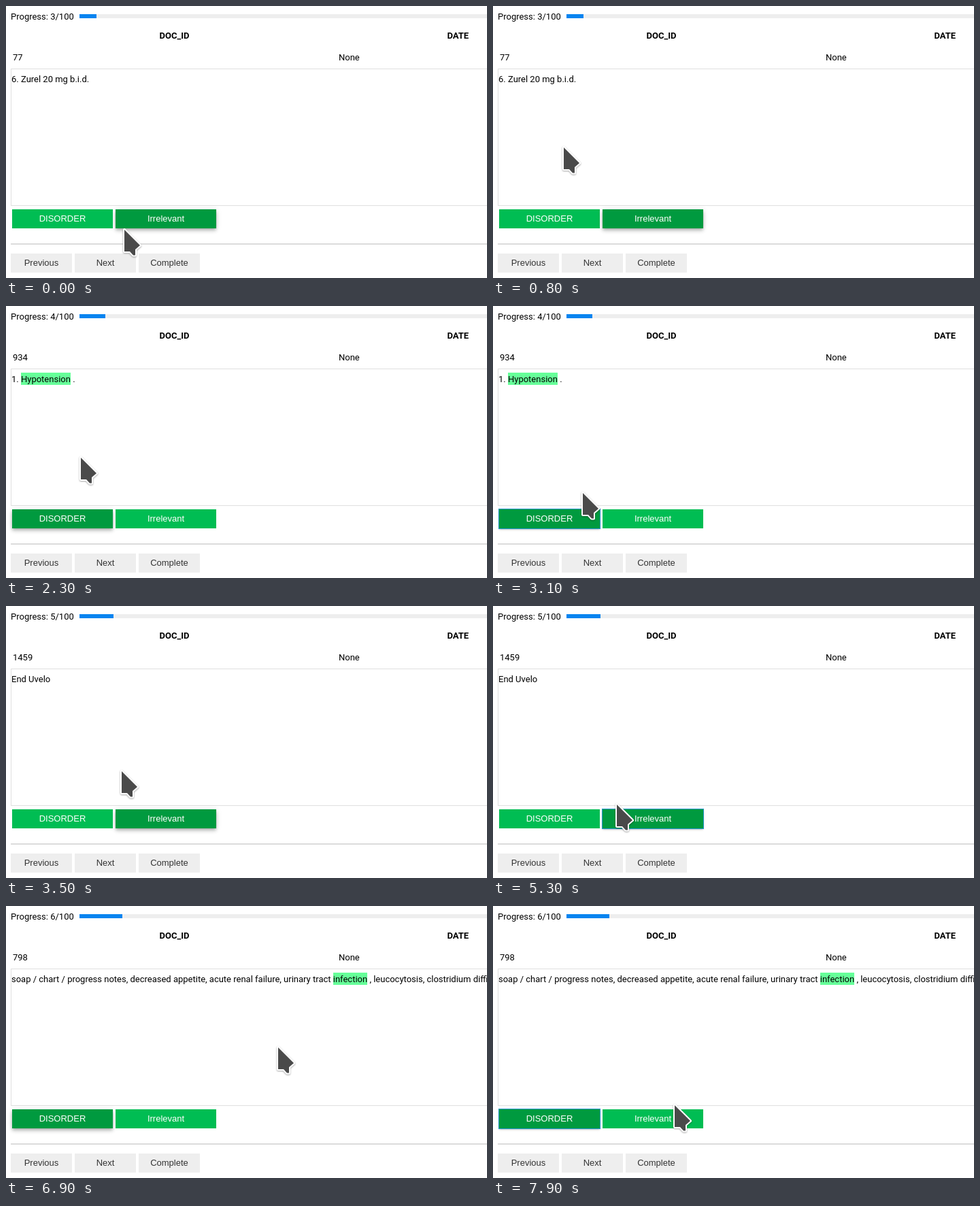
An HTML page that plays this animation: 707 by 400 pixels, repeating every 8 s.

```html
<!DOCTYPE html>
<html lang="en">
<head>
<meta charset="utf-8">
<style>
html, body { margin: 0; width: 100%; height: 100%; overflow: hidden; background: #fff; }
#stage { position: relative; width: 707px; height: 400px; overflow: hidden; font: 13px/15px Roboto, sans-serif; color: #000; }
#stage div, #cursor { position: absolute; white-space: pre; }
b { font-weight: 700; }
mark { background: #66ff99; color: #000; padding: 2px 0 1px; }
#track { left: 108px; top: 12px; width: 1255px; height: 6px; background: #eee; }
#bar { height: 6px; background: #0884f0; }
#box { left: 7px; top: 92px; width: 1400px; height: 200px; border: 1px solid #e0e0e0; }
#rule { left: 7px; top: 349px; width: 1400px; height: 2px; background: #dcdcdc; }
#stage .btn { height: 28px; font: 13px/28px "Liberation Sans", Arial, sans-serif; text-align: center; }
.nav { top: 364px; width: 90px; background: #eee; color: #333; }
.label { top: 299px; width: 148px; background: #00bd53; color: #fff; }
.on { background: #009a3f; box-shadow: 0 4px 5px rgba(0,0,0,.14), 0 1px 10px rgba(0,0,0,.12), 0 2px 4px -1px rgba(0,0,0,.2); }
.hover, .focus { box-shadow: 0 2px 2px rgba(0,0,0,.14), 0 3px 1px -2px rgba(0,0,0,.2), 0 1px 5px rgba(0,0,0,.12); }
.focus { outline: 1px solid #2196c8; }
#cursor { left: 0; top: 0; overflow: visible; filter: drop-shadow(0 1px 1px rgba(0,0,0,.35)); }
#cursor path { fill: #4a4a4a; stroke: #fff; stroke-width: 4; stroke-linejoin: round; paint-order: stroke; }
</style>
</head>
<body>
<div id="stage">
  <div id="page">
    <div id="progress" style="left:7px;top:8px"></div>
    <div id="track"><div id="bar"></div></div>
    <div style="left:225.5px;top:36px"><b>DOC_ID</b></div>
    <div style="left:648.5px;top:36px"><b>DATE</b></div>
    <div id="docId" style="left:10px;top:68px"></div>
    <div style="left:489px;top:68px">None</div>
    <div id="box"></div>
    <div id="note" style="left:8px;top:100px"></div>
    <div class="btn label" style="left:9px">DISORDER</div>
    <div class="btn label" style="left:161px">Irrelevant</div>
    <div id="rule"></div>
    <div class="btn nav" style="left:7px">Previous</div>
    <div class="btn nav" style="left:101px">Next</div>
    <div class="btn nav" style="left:195px">Complete</div>
  </div>
  <svg id="cursor" width="30" height="46"><path d="M2 2V34H10L15 39.5H18V31L25 25Z"/></svg>
</div>
<script>
const LOOP = 8000, STEP = 100;
const PRESS = 500; // a label keeps focus this long before its document closes
const $ = id => document.getElementById(id);
const labels = [...document.querySelectorAll('.label')];

const docs = [
  { start: 0, end: 1700, id: 77, note: '6. Zurel 20 mg b.i.d.' },
  { start: 1700, end: 3300, id: 934, note: '1. <mark>Hypotension</mark> .' },
  { start: 3500, end: 5700, id: 1459, note: 'End Uvelo' },
  { start: 5800, end: LOOP, id: 798,
    note: 'soap / chart / progress notes, decreased appetite, acute renal failure, urinary tract <mark>infection</mark> , leucocytosis, clostridium difficile colitis' }
];

// The pointer rests between moves
const home = { x: 172, y: 327 };
const moves = [
  { from: 0, to: 800, x: 102, y: 206 },
  { from: 800, to: 1200, x: 170, y: 306 },
  { from: 1200, to: 1900, x: 108, y: 221 },
  { from: 2300, to: 2800, x: 92, y: 304 },
  { from: 2900, to: 3500, x: 168, y: 241 },
  { from: 3800, to: 4100, x: 180, y: 290 },
  { from: 5300, to: 5800, x: 167, y: 265 },
  { from: 6100, to: 6900, x: 398, y: 206 },
  { from: 6900, to: 7300, x: 82, y: 322 },
  { from: 7700, to: 7900, x: 265, y: 291 }
];

const easeOut = k => Math.sin(k * Math.PI / 2);

function pointer(time) {
  let { x, y } = home;
  for (const m of moves) {
    const k = easeOut(Math.min(1, Math.max(0, (time - m.from) / (m.to - m.from))));
    x += (m.x - x) * k;
    y += (m.y - y) * k;
  }
  return [Math.round(x), Math.round(y)];
}

function draw() {
  const time = Math.floor(performance.now() % LOOP / STEP) * STEP;
  const doc = docs.findLast(d => d.start <= time);
  const count = docs.indexOf(doc) + 3;
  const selected = doc.note.includes('<mark>') ? 0 : 1;
  const [x, y] = pointer(time);

  $('page').style.visibility = time < doc.end ? 'visible' : 'hidden';
  $('progress').textContent = `Progress: ${count}/100`;
  $('bar').style.width = count - 1 + '%';
  $('docId').textContent = doc.id;
  $('note').innerHTML = doc.note;

  labels.forEach((el, i) => {
    const dx = x + 2 - el.offsetLeft, dy = y + 5 - el.offsetTop;
    const on = i === selected;
    el.classList.toggle('on', on);
    el.classList.toggle('hover', dx >= 0 && dx < el.offsetWidth && dy >= 0 && dy < el.offsetHeight);
    el.classList.toggle('focus', on && time >= doc.end - PRESS);
  });
  $('cursor').style.transform = `translate(${x}px, ${y}px)`;
  requestAnimationFrame(draw);
}
draw();
</script>
</body>
</html>
```
